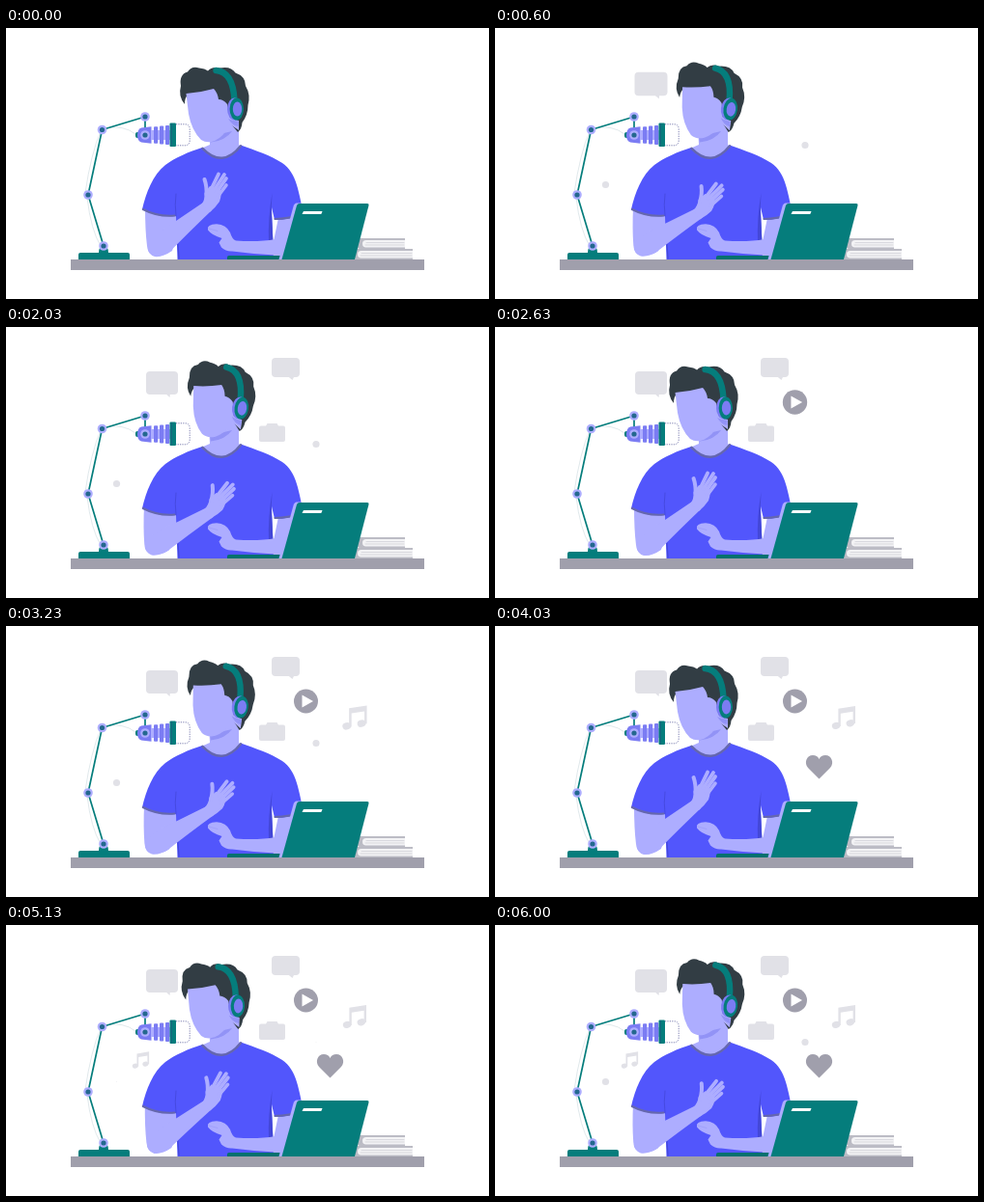
An HTML page with a canvas for the animation above (6.03 s loop, 500 px wide and 281 px high).

```html
<!DOCTYPE html>
<html lang="en">
<head>
<meta charset="utf-8">
<title>Podcast host</title>
<style>
html, body { margin: 0; width: 100%; height: 100%; overflow: hidden; background: #fff; }
canvas { display: block; width: 500px; height: 281px; }
</style>
</head>
<body>
<canvas id="stage"></canvas>
<script>
const W = 500, H = 281, LOOP = 6030, STEP = 100 / 3, BEAT = 2000 / 3;
const SKIN = '#adadff', SHADE = '#9293f6', SHIRT = '#5256fc', FOLD = '#4347d8', HEM = '#6567ae',
  TEAL = '#057d7c', HAIR = '#323d44', GREY = '#a09fac', PALE = '#e1e1e7', VIOLET = '#7b7cf3';

const canvas = document.getElementById('stage');
const ratio = window.devicePixelRatio || 1;
canvas.width = Math.round(W * ratio);
canvas.height = Math.round(H * ratio);
const ctx = canvas.getContext('2d');
ctx.lineCap = ctx.lineJoin = 'round';

const fill = (d, color) => { ctx.fillStyle = color; ctx.fill(new Path2D(d)); };

function line(d, color, width) {
  ctx.strokeStyle = color;
  ctx.lineWidth = width;
  ctx.stroke(new Path2D(d));
}

function oval(x, y, rx, ry, color, tilt = 0) {
  ctx.fillStyle = color;
  ctx.beginPath();
  ctx.ellipse(x, y, rx, ry, tilt, 0, Math.PI * 2);
  ctx.fill();
}

const disc = (x, y, r, color) => oval(x, y, r, r, color);

function box(x, y, w, h, r, color) {
  ctx.fillStyle = color;
  ctx.beginPath();
  ctx.roundRect(x, y, w, h, r);
  ctx.fill();
}

function turn(x, y, degrees) {
  ctx.translate(x, y);
  ctx.rotate(degrees * Math.PI / 180);
  ctx.translate(-x, -y);
}

function group(draw) {
  ctx.save();
  draw();
  ctx.restore();
}

function scaled(x, y, s, draw) {
  if (s <= 0) return;
  group(() => {
    ctx.translate(x, y);
    ctx.scale(s, s);
    draw();
  });
}

// Easing
const sineInOut = p => (1 - Math.cos(Math.PI * p)) / 2;
const cubicInOut = p => p < 0.5 ? 4 * p ** 3 : 1 - 4 * (1 - p) ** 3;
function backOut(p) {
  const c = 1.70158, q = Math.min(1, Math.max(0, p)) - 1;
  return 1 + (c + 1) * q ** 3 + c * q ** 2;
}

// Icons, drawn around their own centre
function note() {
  oval(-7.9, 8.4, 4.3, 3.5, PALE, -0.3);
  oval(6.8, 5.8, 4.3, 3.5, PALE, -0.3);
  fill('M-5.6 -9.2 L12 -12 V6 H9.6 V-6.2 L-3.2 -4.2 V9 H-5.6 Z', PALE);
}

const icons = [
  { x: 161.5, y: 58.5, draw() {
    box(-16.5, -12.5, 33, 24, 4, PALE);
    fill('M3 10 L8 14.5 L8.5 10 Z', PALE);
  } },
  { x: 289.5, y: 43, draw() {
    box(-14.5, -11, 29, 20, 4, PALE);
    fill('M2 8 L7 12 L9 8 Z', PALE);
  } },
  { x: 275.5, y: 109.5, draw() {
    box(-13.5, -7, 27, 16.5, 2, PALE);
    fill('M-7 -6 L-5 -9.5 H5 L7 -6 Z', PALE);
  } },
  { x: 310.5, y: 78, draw() {
    disc(0, 0, 12.5, GREY);
    fill('M-4 -6.5 V6.5 L7.5 0 Z', '#fff');
  } },
  { x: 361, y: 95, draw: note },
  { x: 335.5, y: 146, draw() {
    fill('M0 12.5 L-11.5 1 C-16 -4 -13 -12 -6.5 -12 C-3.5 -12 -1 -10.5 0 -8 C1 -10.5 3.5 -12 6.5 -12 C13 -12 16 -4 11.5 1 Z', GREY);
  } },
  { x: 139.5, y: 140, size: 0.72, draw: note }
];

function micStand() {
  fill('M75 240 V235 Q75 233 77 233 H126 Q128 233 128 235 V240 Z', TEAL);
  fill('M96 233 Q96 226 101 226 Q106 226 106 233 Z', TEAL);
  line('M98 107 Q88 130 82 171 M84 176 Q88 210 98 226 M102 104 Q122 100 134 110', '#d3dfe2', 0.7);
  line('M101 226 L85 173 L99.5 105.5 L144 92 V111', TEAL, 1.7);

  // Microphone
  box(134, 108, 5, 6, 2, TEAL);
  fill('M140 103.5 L150.5 102.3 V119.7 L140 118.5 Q136 117 136 111 Q136 105 140 103.5 Z', VIOLET);
  box(150, 106, 20, 10, 0, SKIN);
  for (let i = 0; i < 3; i++) {
    const half = 8.8 + i * 0.6;
    box(153 + i * 6, 111 - half, 4.2, 2 * half, 1, VIOLET);
  }
  box(176, 99.5, 14.5, 22.5, [1, 5, 5, 1], '#fff');
  ctx.setLineDash([1.2, 1.2]);
  ctx.lineCap = 'butt';
  line('M176 99.8 H185 Q190.2 99.8 190.2 105 V116.5 Q190.2 121.8 185 121.8 H176', '#6d6fa8', 0.9);
  ctx.setLineDash([]);
  ctx.lineCap = 'round';
  box(169.5, 98.5, 6.5, 24.5, 1, TEAL);
  line('M171.3 99.5 V122', '#235f80', 0.8);

  for (const [x, y] of [[101, 226], [85, 173], [99.5, 105.5], [144, 92], [144, 111]]) {
    disc(x, y, 4.8, SKIN);
    disc(x, y, 2.6, '#24688f');
  }
}

function desk() {
  box(67, 240, 366, 11, 0, GREY);
}

function books() {
  for (const [x, y, w] of [[367, 218, 46], [362, 229, 59]]) {
    box(x - 4, y, w + 4, 11, [4, 0, 0, 4], '#bcbcc5');
    box(x + 2, y + 2, w - 2, 7.5, [4, 0, 0, 4], '#f3f3f5');
    line(`M${x + 6} ${y + 4.6} H${x + w - 1} M${x + 5} ${y + 7} H${x + w - 1}`, '#d0d0d6', 0.8);
  }
}

function upperArm(sway) {
  group(() => {
    turn(165, 162, 2.5 * sway);
    fill('M144 185 L180 185 L180 205 L172 231 Q162 238 154 237 Q147 235 146 226 Q144 210 144 185 Z', SKIN);
  });
}

function torso() {
  // Resting arm above the elbow
  fill('M283 192 H295 Q296 210 298 222 L297 240 H272 L277 221 Z', SKIN);
  fill('M203 124 Q224 144 243 121.5 C258 127 274 132 286 140 C301 150 303 171 308 193 Q293 199 278 199 L275 186 L277 240 H177.5 L176 195 Q158 197 141 188 C145 171 152 152 165 142 C174 135 190 128 203 124 Z', SHIRT);
  line('M141.8 188 Q157 196 174.5 194.5 M278.5 198 Q293 198 307 192.5', HEM, 2.2);
  line('M176 172 Q174.5 183 176 195', FOLD, 0.8);
  fill('M275.5 171 Q271 198 272 222 L276.5 222 L274.7 188 Z', FOLD);
  line('M178 224 L179 239', FOLD, 1.2);
}

function neck() {
  fill('M210 101 L241 92 V121 L243 122.5 Q224 147 203 124.5 L211 121 Z', SKIN);
  fill('M211 112.5 L234 107 Q227 117 212 118.5 Z', SHADE);
  line('M203.5 124.8 Q224 146 243 122.3', HEM, 2.5);
}

function restingArm() {
  fill('M297 216 Q298 236 286 236 Q260 235 234 231.5 Q228 232 223 227.5 L220.5 222.5 L223.5 218 Q213 215 209 209.5 Q207.5 203.5 218 203.3 Q228 204 232 212 Q234 219 238 220.5 Q262 222 279 219 Z', SKIN);
  line('M210 208 L219 210.5', SHADE, 0.5);
}

function laptop() {
  fill('M229 237.5 Q229 236 231 236 H290 V240 H229 Z', '#04706f');
  fill('M301 181.5 H306 L290 240 H282.5 L297.5 185 Q298.5 181.5 301 181.5 Z', SKIN);
  fill('M304 182 H374 Q376 182 375.5 184 L361 240 H285.5 L301 184 Q301.7 182 304 182 Z', TEAL);
  fill('M308 190 H327.5 L326.3 193 H306.5 Z', '#fff');
}

function head(sway) {
  group(() => {
    turn(240, 120, 8 * sway);
    fill('M185 79 Q178 71 181 60 Q179 48 188 45.5 Q192 39 200 41.5 Q206 42 209 44.5 Q213 39.5 221 41.5 Q233 39 237.5 46.5 Q248 50 248 60 Q253.5 69 250.5 80 Q250.5 90 244.5 98 Q244 105 240 108 L225 90 L212 66 L188 70 Q185 72 185 79 Z', HAIR);
    fill('M186.5 68 Q201 67 215 63 Q219 67 220 74 Q225 74 229 79 L232 93 L241 96 V106 L232 100 Q225 113 216 117 Q208 120 202 116 Q192 106 189 89 Z', SKIN);
    fill('M230 94 Q236 97 240.5 96.5 V102 Q234 101 230 94 Z', SHADE);
    line('M217.5 44 Q235 45.5 236.5 75', TEAL, 6.4);
    oval(236.8, 84, 7.8, 11.5, VIOLET);
    oval(238.8, 84, 7.2, 11.5, TEAL);
    oval(239.5, 84, 4.7, 7.4, VIOLET);
  });
}

function raisedArm(sway) {
  group(() => {
    turn(165, 162, 2.5 * sway);
    turn(157, 227, 5.5 * sway);
    fill('M148 222 Q160 209 176 200 L204 181 L213 189 Q189 212 170 231.5 Q160 238 153 236 Q144 233 148 222 Z', SKIN);
    turn(208, 183, 4 * sway);
    fill('M202.5 183 Q206 178 205.5 171 L211 164 L221 166 Q224 172 221 180 Q217 186 211 191 Z', SKIN);
    line('M207.5 173 Q208 164 205.5 157', SKIN, 4);
    line('M213 166 L220 151.5', SKIN, 3.8);
    line('M215.5 168 L226 152', SKIN, 3.8);
    line('M217.5 171 L228 156', SKIN, 3.8);
    line('M219 175 L228 163', SKIN, 3.6);
  });
}

function render(time) {
  const phase = time / BEAT % 2;
  const half = phase < 1 ? phase : 2 - phase;
  const sway = sineInOut(half);

  ctx.setTransform(ratio, 0, 0, ratio, 0, 0);
  ctx.fillStyle = '#fff';
  ctx.fillRect(0, 0, W, H);

  icons.forEach((icon, i) => {
    const pop = backOut((time - STEP - i * BEAT) / BEAT);
    scaled(icon.x, icon.y, pop * (icon.size || 1), icon.draw);
  });
  for (const [x, y] of [[114.5, 162.5], [321, 121.5]]) {
    scaled(x, y, cubicInOut(half), () => disc(0, 0, 3.6, PALE));
  }

  books();
  upperArm(sway);
  torso();
  neck();
  head(sway);
  micStand();
  restingArm();
  raisedArm(sway);
  laptop();
  desk();
}

const start = performance.now();
function tick() {
  const t = (performance.now() - start) % LOOP;
  render(Math.floor((t + 3.4) / STEP) * STEP);
  requestAnimationFrame(tick);
}
tick();
</script>
</body>
</html>
```
